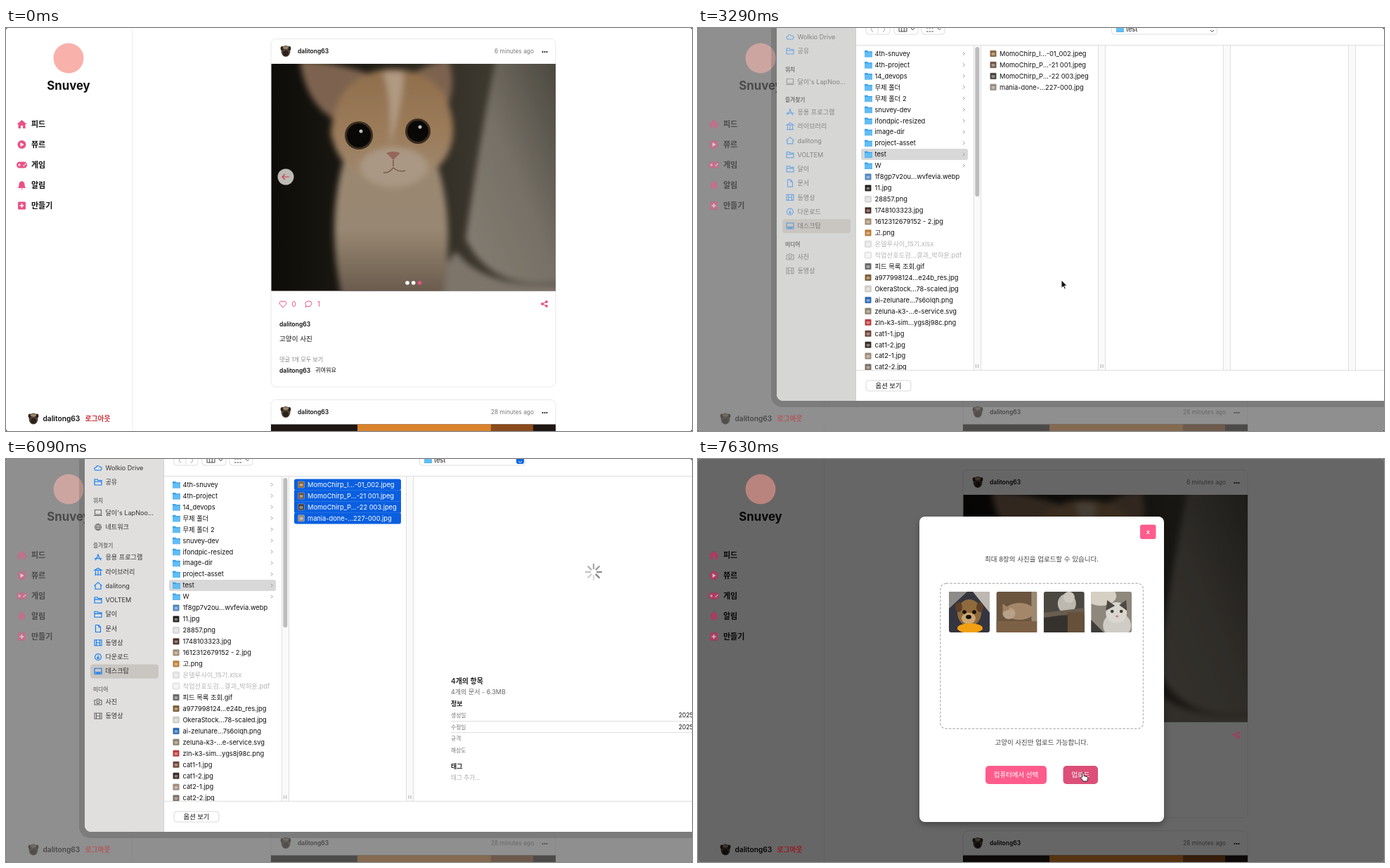
Write an HTML page that moves like this. It is 976 px wide and 574 px high and loops after 8 s.

```html
<!DOCTYPE html>
<html lang="ko">
<head>
<meta charset="utf-8">
<title>Feed upload</title>
<style>
html, body { margin: 0; width: 100%; height: 100%; overflow: hidden; background: #444; }
svg { display: block; width: 976px; height: 574px; border-radius: 4px; background: #fff; }
text { font-family: Inter, "Noto Sans CJK KR", "Noto Sans CJK", sans-serif; white-space: pre; }
.side { stroke: #0a78f0; fill: none; stroke-width: 1.1; }
.off .side, .off .sideText { opacity: .5; }
.off #sideBg { fill: #d6d6d5; }
#card { filter: drop-shadow(0 4px 4px rgba(0, 0, 0, .3)); }
#chevBox { fill: #0a66e6; }
#chev { stroke: #fff; }
.off #chevBox { fill: none; }
.off #chev { stroke: #333; }
</style>
</head>
<body>
<svg id="stage" viewBox="0 0 976 574"></svg>
<script>
const PINK = '#ff5c8d', ROSE = '#ea5184', USER = 'dalitong63';

// y is the vertical middle of the line
const text = (x, y, s, size, fill = '#111', more = '') =>
  `<text x="${x}" y="${y + size * .36}" font-size="${size}" fill="${fill}" ${more}>${s}</text>`;
const rect = (x, y, w, h, fill, r = 0, more = '') =>
  `<rect x="${x}" y="${y}" width="${w}" height="${h}" rx="${r}" fill="${fill}" ${more}/>`;
const circle = (x, y, r, fill, more = '') => `<circle cx="${x}" cy="${y}" r="${r}" fill="${fill}" ${more}/>`;
const oval = (x, y, rx, ry, fill) => `<ellipse cx="${x}" cy="${y}" rx="${rx}" ry="${ry}" fill="${fill}"/>`;
const path = (d, fill = 'none', more = '') => `<path d="${d}" fill="${fill}" ${more}/>`;
const line = (x1, y1, x2, y2, c = '#dedede') => path(`M${x1} ${y1}L${x2} ${y2}`, 'none', `stroke="${c}"`);
const at = (x, y, s) => `<g transform="translate(${x} ${y})">${s}</g>`;
const group = (id, s, more = '') => `<g id="${id}" ${more}>${s}</g>`;
const bold = 'font-weight="700"', semi = 'font-weight="600"', mid = 'text-anchor="middle"';

const avatar = (x, y) => at(x, y,
  oval(0, 0, 6.5, 8, '#54453a') + oval(-5, -4, 2.4, 3, '#2d241e') + oval(5, -4, 2.4, 3, '#2d241e') +
  oval(0, 3, 4, 4, '#2a211c') + oval(0, -5, 4, 2, '#9a8468'));

/* ---------- feed page ---------- */
const menuIcons = [
  path('M0-6L7 0H5V6H1.6V2H-1.6V6H-5V0H-7Z', ROSE),
  circle(0, 0, 6, ROSE) + path('M-2-3L3.2 0L-2 3Z', '#fff'),
  rect(-7.5, -4.5, 15, 9, ROSE, 4.5) + path('M-5.5 0h4M-3.5-2v4', 'none', 'stroke="#fff"') +
    circle(3, 1, 1, '#fff') + circle(5, -1, 1, '#fff'),
  path('M0-6Q4-5 4-1Q4 2 5.5 4H-5.5Q-4 2-4-1Q-4-5 0-6ZM-1.5 5h3Q0 7-1.5 5Z', ROSE),
  rect(-5.5, -5.5, 11, 11, ROSE, 1.5) + path('M-3 0h6M0-3v6', 'none', 'stroke="#fff" stroke-width="1.5"')
];
const accents =
  circle(89, 43, 21.5, '#f9b1ab') +
  menuIcons.map((m, i) => at(22.5, 137 + 29 * i, m)).join('') +
  text(112.5, 556, '로그아웃', 9.8, '#cb3038', semi) +
  at(766, 393, path('M3-3L-3 0L3 3', 'none', `stroke="${ROSE}" stroke-width="1.3"`) +
    circle(3, -3, 1.9, ROSE) + circle(-3, 0, 1.9, ROSE) + circle(3, 3, 1.9, ROSE)) +
  group('makeHot', text(36, 253, '만들기', 11, ROSE, bold));

const eye = (x, y, r) => circle(x, y, r + 3, '#3a2c1f') + circle(x, y, r, '#090807') + circle(x + 3, y - 6, 2.5, '#bbb');
const kitten = `<g clip-path="url(#photo)">` + rect(377, 51, 405, 324, 'url(#room)') +
  `<g filter="url(#soft)">` +
  path('M698 40Q675 150 654 300Q690 375 790 362V40Z', 'url(#cup)') +
  path('M590 385L640 318Q680 372 790 366V385Z', '#7d756a') +
  path('M478 385Q455 280 480 190H612Q640 270 622 385Z', 'url(#body)') +
  path('M418 46Q426 108 470 132L530 70Q470 48 418 46ZM630 45Q642 85 625 118L572 70Q600 50 630 45Z', '#7d6450') +
  path('M462 150Q470 62 550 58Q630 62 636 140Q640 205 552 232Q476 215 462 150Z', 'url(#head)') +
  oval(552, 198, 48, 28, '#aa9884') + path('M536 62Q550 100 546 170Q566 100 566 62Z', '#b09a82') +
  `</g>` + eye(502, 153, 17) + eye(586, 147, 15) +
  path('M541 178Q551 174 561 178L551 188Z', '#95675b') + path('M551 188V197M537 206Q545 207 551 199Q559 206 568 203', 'none', 'stroke="#7a5a4e" stroke-width="1.500"') + `</g>`;

const cardTop = (y, ago) => avatar(398, y) + text(415, y, USER, 8.5, '#111', semi) +
  text(751, y, ago, 8.4, '#777', 'text-anchor="end"') +
  [-3, 0, 3].map(d => circle(766.5 + d, y + 1, 1.1, '#111')).join('');

const page = rect(0, 0, 976, 574, '#fff') + line(179.5, 0, 179.5, 574, '#f0f0f0') +
  text(89, 82, 'Snuvey', 16.8, '#111', bold + mid) +
  ['피드', '쮸르', '게임', '알림', '만들기'].map((s, i) => text(36, 137 + 29 * i, s, 11, '#111', bold)).join('') +
  avatar(39, 556.5) + text(52.5, 556, USER, 10.2, '#111', semi) +
  rect(377, 15.5, 405, 495.5, '#fff', 7, 'stroke="#e8e8e8"') + cardTop(33, '6 minutes ago') + kitten +
  circle(398, 212, 11.5, '#bdbab6') + path('M403 212H393M397 208L393 212L397 216', 'none', 'stroke="#c83c4c" stroke-width="1.2"') +
  circle(571, 363, 2.8, '#fff') + circle(579.7, 363, 2.8, '#fff') + circle(588.5, 363, 2.8, ROSE) +
  path('M394 398L389.6 393.4Q388.5 389 392 389Q393.5 389 394 390.5Q394.5 389 396 389Q399.5 389 398.4 393.4Z', 'none', `stroke="${ROSE}"`) +
  text(406.5, 393.5, '0', 9.8, ROSE) +
  path('M426 397.5L427 395Q424.5 392 427 390Q430.5 387.5 434 390Q436.5 393 433.5 395.5Q431 397 428.5 396.5Z', 'none', `stroke="${ROSE}"`) +
  text(443, 393.5, '1', 9.8, ROSE) +
  text(389, 421.5, USER, 8.5, '#111', semi) + text(389, 442.5, '고양이 사진', 9.6) +
  text(389, 472.5, '댓글 1개 모두 보기', 8.1, '#888') +
  text(389, 487.5, USER, 8.5, '#111', semi) + text(440, 487.5, '귀여워요', 8.15) +
  rect(377, 529.5, 405, 80, '#fff', 7, 'stroke="#e8e8e8"') + cardTop(547, '28 minutes ago') +
  rect(377, 564.5, 405, 10, '#1e1713') + rect(500, 564.5, 190, 10, '#d9822b') + rect(690, 564.5, 60, 10, '#8a4a1c') +
  group('accents', accents);

/* ---------- upload modal ---------- */
const button = (x, y, w, s, id) =>
  rect(x, y, w, 26, PINK, 5, `id="${id}"`) + text(x + w / 2, y + 13, s, 9.5, '#fff', mid + ' font-weight="500"');
const thumb = (i, bg, s) =>
  `<svg x="${357 + 67.4 * i}" y="189" width="58" height="58" viewBox="0 0 58 58">${rect(0, 0, 58, 58, bg, 3)}${s}</svg>`;
const thumbs =
  thumb(0, '#34353f', path('M0 0H26L0 24Z', '#8d8c8b') + path('M34 0H58V30Z', '#bdb8b1') +
    oval(29, 30, 17, 19, '#8f6a3c') + oval(14, 22, 5, 7, '#5d4027') + oval(44, 22, 5, 7, '#5d4027') +
    oval(28, 38, 10, 8, '#cda673') + circle(22, 29, 2.8, '#17120f') + circle(36, 29, 2.8, '#17120f') +
    oval(28, 36, 4, 3, '#17120f') + oval(30, 52, 18, 7, '#f2a011')) +
  thumb(1, '#6b553f', rect(50, 0, 8, 58, '#9a8871') + rect(0, 42, 58, 16, '#7d6146') +
    oval(33, 28, 21, 12, '#a4876b') + oval(18, 31, 9, 8, '#b9a088') + path('M9 29L9 17L20 25Z', '#a08064')) +
  thumb(2, '#4b4741', rect(0, 34, 58, 24, '#35322e') + oval(33, 17, 13, 14, '#bdb8af') +
    circle(36, 8, 8, '#cbc6be') + path('M0 30L58 23V29L0 37Z', '#6a5e50') + rect(34, 29, 24, 29, '#66503a')) +
  thumb(3, '#8d877c', oval(14, 6, 22, 14, '#d5d0c3') + path('M0 58V40L18 58Z', '#3f3d39') +
    oval(37, 48, 20, 18, '#cfcbc5') + oval(36, 30, 15, 15, '#d9d5cf') +
    path('M21 27L23 12L34 20ZM51 27L50 12L40 19Z', '#4d4843') + circle(30, 28, 2.3, '#403b2f') +
    circle(43, 28, 2.3, '#403b2f') + oval(37, 35, 2, 1.5, '#b98379'));

const modal = rect(0, 0, 976, 574, '#000', 0, 'opacity=".6"') +
  `<use href="#accents" opacity=".58"/>` +
  rect(315, 82, 348, 435, '#fff', 8, 'id="card"') +
  rect(629, 93.5, 22.5, 20.5, PINK, 3) + text(640.3, 104, 'x', 9, '#fff', mid + semi) +
  group('pick',
    path('M477 233.5H482L484 230H494L496 233.5H501Q503.5 233.5 503.5 236V250.5Q503.5 253 501 253H477Q474.5 253 474.5 250.5V236Q474.5 233.5 477 233.5Z', 'none', 'stroke="#111" stroke-width="1.5"') +
    circle(489, 242.5, 6.3, 'none', 'stroke="#111" stroke-width="1.5"') + circle(499, 237.5, 1.2, '#111') +
    text(489, 280, '사진과 동영상을 여기다 끌어다 놓으세요', 12.2, '#111', bold + mid) +
    text(489, 312.5, '또는 아래 버튼을 눌러 파일을 선택하세요.', 9.5, '#555', mid) +
    button(445.5, 346, 87, '컴퓨터에서 선택', 'pickBtn') +
    group('ring', rect(446, 346.5, 86, 25, 'none', 5, 'stroke="#d9839f"') + rect(629.5, 94, 21.5, 19.5, 'none', 3, 'stroke="#d9839f"'))) +
  group('ready',
    text(489, 143, '최대 8장의 사진을 업로드할 수 있습니다.', 9.5, '#444', mid) +
    rect(344.8, 177.3, 288.7, 206.7, 'none', 8, 'stroke="#bdbdbd" stroke-width="1.4" stroke-dasharray="3.5 2"') + thumbs +
    text(489, 404, '고양이 사진만 업로드 가능합니다.', 9.5, '#444', mid) +
    button(409, 437, 87, '컴퓨터에서 선택', 'moreBtn') + button(519.5, 437, 49.5, '업로드', 'sendBtn'));

/* ---------- file dialog ---------- */
const folder = (x, y) => path(`M${x} ${y - 4.5}h4l1.3 1.2h5.7v8.3h-11z`, '#3ea3e8') + rect(x, y - 2, 11, 6.8, '#62bdf5', 1);
const fileIcon = (x, y, c) => rect(x + 1, y - 4.5, 9, 9, c, 1, 'stroke="#bbb" stroke-width=".5"') + rect(x + 3, y - 1.5, 5, 4, '#fff', 1, 'opacity=".4"');
const rowY = i => 36.5 + 15.95 * i;

const folders = ['4th-snuvey', '4th-project', '14_devops', '무제 폴더', '무제 폴더 2', 'snuvey-dev', 'ifondpic-resized',
  'image-dir', 'project-asset', 'test', 'W'];
const files = [
  ['1f8gp7v2ou...wvfevia.webp', '#4b86c6'], ['11.jpg', '#1d1a16'], ['28857.png', '#dcdcdc'], ['1748103323.jpg', '#4a2b24'],
  ['1612312679152 - 2.jpg', '#a58c70'], ['고.png', '#c07a2c'], ['온델루사이_15기.xlsx', '#e4e4e4'],
  ['직업선호도검...결과_박하윤.pdf', '#f1f1f1'], ['피드 목록 조회.gif', '#666'], ['a977998124...e24b_res.jpg', '#7d5a2c'],
  ['OkeraStock...78-scaled.jpg', '#d3d0c8'], ['ai-zelunare...7s6olqh.png', '#2468b8'], ['zeluna-k3-...e-service.svg', '#8a8268'],
  ['zln-k3-sim...ygs8j98c.png', '#c03434'], ['cat1-1.jpg', '#6c4034'], ['cat1-2.jpg', '#322520'],
  ['cat2-1.jpg', '#a08a78'], ['cat2-2.jpg', '#7b6d62']];
const chosen = [['MomoChirp_I...-01_002.jpeg', '#8a6438'], ['MomoChirp_P...-21 001.jpeg', '#6b5340'],
  ['MomoChirp_P...-22 003.jpeg', '#45403b'], ['mania-done-...227-000.jpg', '#948a80']];

const list = rect(232, rowY(9) - 8, 152, 16, '#d8d8d8', 3) +
  folders.map((s, i) => folder(237, rowY(i)) + text(251.5, rowY(i), s, 9.3) +
    path(`M377 ${rowY(i) - 2.3}l2.3 2.3l-2.3 2.3`, 'none', 'stroke="#999"')).join('') +
  files.map(([s, c], i) => {
    const y = rowY(i + 11);
    return fileIcon(236.5, y, c) + text(251.5, y, s, 9.3, /xlsx|pdf/.test(s) ? '#b5b5b5' : '#111');
  }).join('') +
  chosen.map(([s, c], i) => rect(410, rowY(i) - 8, 152, 16.2, '#0a5fe0', i % 3 ? 0 : 3, `id="sel${i}"`) +
    fileIcon(414.5, rowY(i), c) + text(429, rowY(i), s, 9.3, '#111', `id="name${i}"`)).join('');

const glyph = {
  cloud: 'M-4 3.5Q-7 0-3-.5Q-1-5 2-1.5Q7-1 4 3.5Z', laptop: 'M-4.5-4h9V2.5h-9ZM-6 4h12',
  globe: 'M-4.5 0a4.5 4.5 0 1 0 9 0a4.5 4.5 0 1 0-9 0M-4.5 0h9M0-4.5Q-4 0 0 4.5Q4 0 0-4.5',
  app: 'M-4 4L1-4.5M4 4L-1-4.5M-5.5 1.5H5.5', lib: 'M-5-2L0-5L5-2ZM-3.5-1V4M0-1V4M3.5-1V4M-5 4.5H5',
  home: 'M-5.5 0L0-5L5.5 0M-4-1V4.5H4V-1', dir: 'M-5-4h4l1 1.5h5V4h-10ZM-5-.8h10',
  doc: 'M-3.5-5H1L3.5-2V5H-3.5ZM1-5V-2H3.5', film: 'M-5-4H5V4H-5ZM-2.5-4V4M2.5-4V4M-2.5 0H2.5',
  down: 'M-4.5 0a4.5 4.5 0 1 0 9 0a4.5 4.5 0 1 0-9 0M0-2.5V2.5M-2 .5L0 2.5L2 .5',
  desk: 'M-5-4H5V4H-5ZM-5 1.5H5M-3 2.8H3', cam: 'M-5-2.5H-2.5L-1.5-4H1.5L2.5-2.5H5V4H-5ZM-2 .5a2 2 0 1 0 4 0a2 2 0 1 0-4 0'
};
const place = (y, icon, s, gray) => at(131, y, path(glyph[icon], 'none', gray ? 'class="side" style="stroke:#666"' : 'class="side"')) +
  text(141.5, y, s, 9.1, '#333', 'class="sideText"');
const head = (y, s) => text(124, y, s, 7.7, '#777', semi);
const sidebar = rect(112, -30, 112.5, 561, '#e0dfde', 0, 'id="sideBg"') +
  place(12.5, 'cloud', 'Wolkio Drive') + place(33, 'dir', '공유') + head(59, '위치') +
  place(76.5, 'laptop', '달이\'s LapNoo...', 1) + group('net', place(97, 'globe', '네트워크', 1)) +
  group('low', head(123, '즐겨찾기') + rect(120, 292.5, 97, 20, '#c9c5c1', 4) +
    [['app', '응용 프로그램'], ['lib', '라이브러리'], ['home', 'dalitong'], ['dir', 'VOLTEM'], ['dir', '달이'], ['doc', '문서'],
      ['film', '동영상'], ['down', '다운로드'], ['desk', '데스크탑']].map(([g, s], i) => place(140.2 + 20.25 * i, g, s)).join('') +
    head(328.5, '미디어') + place(346, 'cam', '사진', 1) + place(366, 'film', '동영상', 1));

const box = (x, w) => rect(x, -8, w, 17, '#fff', 4, 'stroke="#ddd"');
const toolbar = box(239, 34) + line(256, -8, 256, 8) + path('M249-2l-3 4l3 4M263-2l3 4l-3 4', 'none', 'stroke="#aaa"') +
  box(279, 34) + path('M286-2h11v7h-11zM289.7-2v7M293.3-2v7M303 0l2.5 3l2.5-3', 'none', 'stroke="#444"') +
  box(318, 33) + path('M325 0h10M325 5h10M341 0l2.5 3l2.5-3', 'none', 'stroke="#444" stroke-dasharray="2.5 1.2"') +
  box(588.5, 150) + folder(595, 1) + text(609, 1.5, 'test', 9.3) + rect(726, -4, 11, 11, '', 3, 'id="chevBox"') +
  path('M729 0l2.5-2.5l2.5 2.5M729 3l2.5 2.5l2.5-2.5', 'none', 'id="chev"') + line(225, 24.5, 976, 24.5);

const gap = x => rect(x, 25, 10, 462, '#fafafa') + line(x, 25, x, 487) + line(x + 10, 25, x + 10, 487);
const grip = x => path(`M${x - 1.5} 479v5M${x + 1.5} 479v5`, 'none', 'stroke="#999" stroke-width=".8"');
const spokes = Array.from({ length: 8 }, (_, i) => `<path d="M0-5V-11" stroke="#777" stroke-width="2.4" stroke-linecap="round" opacity="${.25 + .09 * i}" transform="rotate(${45 * i})"/>`).join('');
const preview = text(633, 316, '4개의 항목', 10, '#222', semi) + text(633, 331.5, '4개의 문서 - 6.3MB', 9, '#666') +
  text(633, 349, '정보', 9, '#222', semi) +
  ['생성일', '수정일', '규격', '해상도'].map((s, i) => text(633, 365.3 + 16.6 * i, s, 7.8, '#777')).join('') +
  line(633, 373.5, 976, 373.5) + line(633, 389.5, 976, 389.5) +
  text(957, 365.3, '2025년', 8.4) + text(957, 382, '2025년', 8.4) +
  text(633, 437.5, '태그', 9, '#222', semi) + text(633, 454, '태그 추가...', 8.6, '#aaa') +
  at(836, 161, group('spin', spokes));

const dialog = rect(0, 0, 976, 574, '#fff', 0, 'opacity=".27"') +
  group('sheet',
    rect(104, -40, 900, 580, '#000', 16, 'opacity=".13"') + rect(112, -40, 900, 571, '#fff', 9) +
    `<g clip-path="url(#sheetClip)">${sidebar}</g>` + line(224.5, -30, 224.5, 531, '#cfcfcf') + toolbar + list +
    gap(392.5) + rect(394.3, 27, 6, 213, '#bdbdbd', 3) + gap(569.5) + grip(397) + grip(574.5) +
    group('blank', gap(747.5) + gap(925.5)) + group('preview', preview) +
    rect(225, 487, 760, 35, '#fff') + line(225, 487.5, 976, 487.5) +
    rect(239, 502, 64, 15, '#fff', 4, 'stroke="#d9d9d9"') + text(271, 509.5, '옵션 보기', 9.3, '#111', mid));

const cursor = group('arrow', path('M0 0V11.5L2.7 9L4.4 13L6.2 12.2L4.5 8.3H8Z', '#111', 'stroke="#fff" stroke-width=".9"')) +
  group('hand', path('M-1.2 6V1a1.2 1.2 0 0 1 2.4 0V4.5l4.5 1.2q1.2 .4 1 1.8l-.8 4.5h-5.5l-3.8-4.5q-.4-1.4 1-1z', '#fff', 'stroke="#111" stroke-width=".9"'));

const gradient = (id, dir, ...colors) => `<linearGradient id="${id}" ${dir}>` +
  colors.map((c, i) => `<stop offset="${i / (colors.length - 1)}" stop-color="${c}"/>`).join('') + `</linearGradient>`;
const down = 'x2="0" y2="1"';

const $ = id => document.getElementById(id);
$('stage').innerHTML = `<defs>
  <clipPath id="photo"><rect x="377.5" y="51" width="404.5" height="323.5"/></clipPath>
  <clipPath id="sheetClip"><rect x="112" y="-40" width="900" height="571" rx="9"/></clipPath>
  <filter id="soft"><feGaussianBlur stdDeviation="4"/></filter>` +
  gradient('room', '', '#0d0c08', '#1e1b15', '#38332a', '#4c463c') +
  gradient('cup', 'y1="1" x2="1" y2="0"', '#857e73', '#767066', '#48443c') +
  gradient('head', down, '#8f6e4c', '#9b7b59', '#a08c76') +
  gradient('body', down, '#9a8771', '#988772', '#65574a') +
  `</defs>` + page + group('modal', modal) + group('dialog', dialog) + group('cursor', cursor);

/* ---------- motion ---------- */
const moves = [[140, 383, 494], [700, 64, 243], [840, 64, 243], [980, 58, 256], [1330, 58, 256], [1960, 524, 374],
  [2170, 517, 367], [2870, 517, 367], [3010, 517, 359], [3570, 517, 359], [4130, 540, 112], [4270, 540, 110],
  [4900, 438, 42], [5180, 438, 42], [5600, 990, 470], [6440, 990, 470], [6930, 560, 428], [7350, 553, 421], [7560, 548, 447]];
const clamp = v => Math.max(0, Math.min(1, v));
const show = (id, on) => $(id).style.display = on ? '' : 'none';

function cursorAt(t) {
  const i = moves.findIndex(m => m[0] > t);
  if (i < 1) return moves[i < 0 ? moves.length - 1 : 0].slice(1);
  const [t0, x0, y0] = moves[i - 1], [t1, x1, y1] = moves[i];
  const k = (t - t0) / (t1 - t0), e = k * k * (3 - 2 * k);
  return [x0 + (x1 - x0) * e, y0 + (y1 - y0) * e];
}

function draw(t) {
  const [x, y] = cursorAt(t);
  const overPick = t >= 1890 && t < 3010, overSend = t >= 7420 && y > 436;
  const hand = overPick || overSend;
  $('cursor').setAttribute('transform', `translate(${x} ${y})`);
  show('cursor', t >= 70);
  show('hand', hand);
  show('arrow', !hand);

  show('makeHot', t >= 770 && t < 1400);
  show('modal', t >= 1050);
  show('pick', t < 6580);
  show('ready', t >= 6580);
  show('ring', t >= 6118);
  $('pickBtn').style.fill = overPick ? '#dc4f79' : PINK;
  $('sendBtn').style.fill = overSend ? '#dc4f79' : PINK;

  const open = t < 5000 ? clamp((t - 3010) / 270) : 1 - clamp((t - 6118) / 280);
  const active = t >= 3570 && t < 6118;
  show('dialog', open > 0);
  $('dialog').setAttribute('opacity', open);
  $('dialog').setAttribute('class', active ? '' : 'off');
  $('sheet').setAttribute('transform', `translate(0 ${-26 * (1 - open)})`);
  show('net', t >= 3570);
  $('low').setAttribute('transform', `translate(0 ${t < 3570 ? -20.3 : 0})`);
  show('blank', t < 5180);
  show('preview', t >= 5180);
  $('spin').setAttribute('transform', `rotate(${45 * Math.floor(t / 100)})`);
  chosen.forEach((_, i) => {
    const on = t >= 4270 && (t > 4900 || y < rowY(i) + 8);
    show('sel' + i, on);
    $('sel' + i).style.fill = active ? '#0a5fe0' : '#cfccc8';
    $('name' + i).style.fill = on && active ? '#fff' : '#111';
  });
}

function tick() {
  draw(performance.now() % 8000);
  requestAnimationFrame(tick);
}
tick();
</script>
</body>
</html>
```
